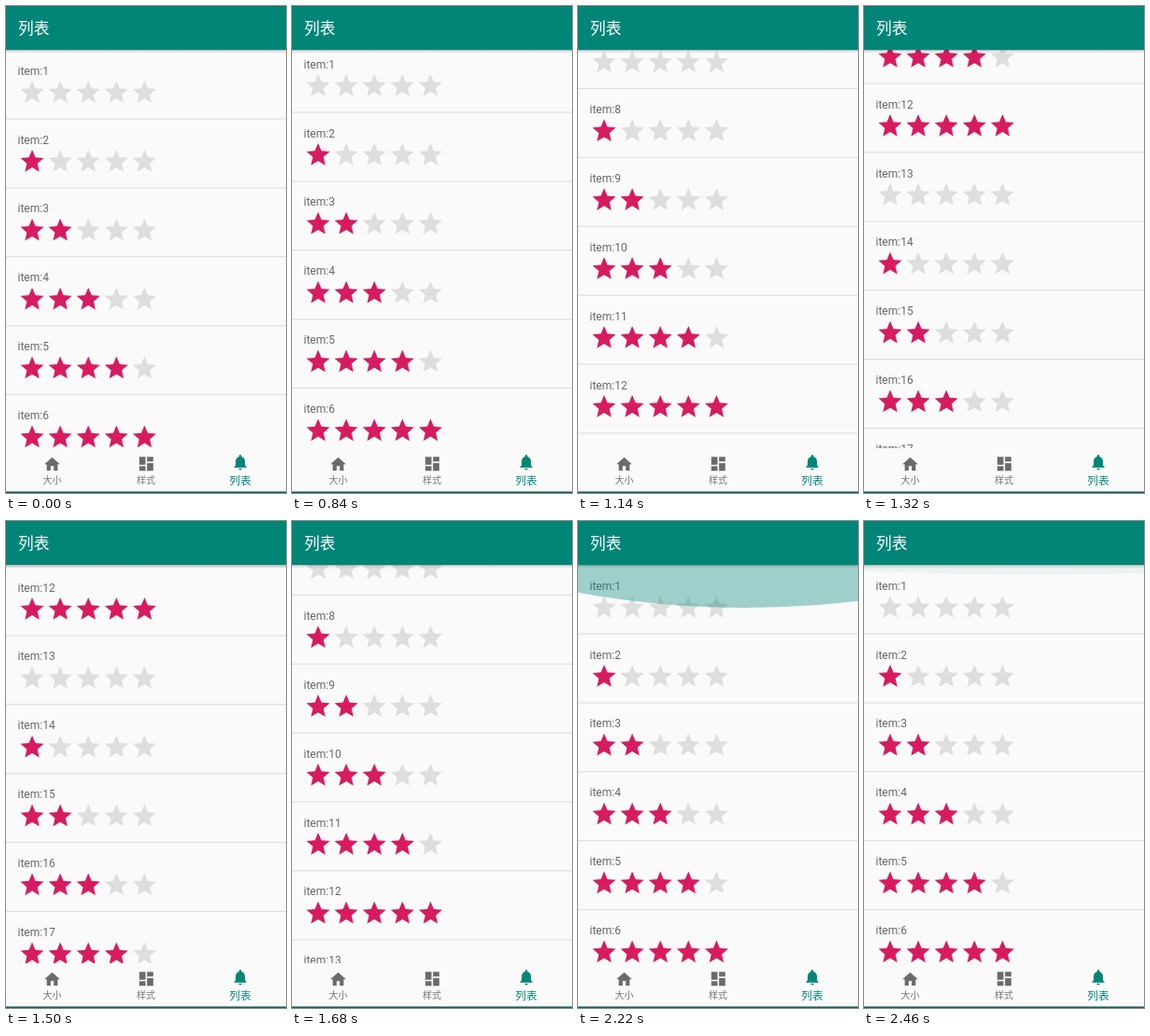
Recreate the animation shown at these times as an HTML page. Size 300 px wide and 522 px high, loop 2520 ms.

```html
<!DOCTYPE html>
<html lang="zh-CN">
<head>
<meta charset="utf-8">
<title>列表</title>
<style>
  html, body { margin: 0; width: 100%; height: 100%; overflow: hidden; background: #fafafa; }
  svg { display: block; width: 300px; height: 522px; }
  text { font-family: Roboto, "Noto Sans CJK SC", "Noto Sans CJK", sans-serif; }
  .item { font-size: 12px; fill: #686868; }
  .title { font-size: 16.7px; fill: #fff; }
  .tab { font-size: 10px; fill: #757575; text-anchor: middle; }
  .tab.on { font-size: 11.7px; fill: #008577; }
  .icon { fill: #6b6b6b; }
  .icon.on { fill: #008577; }
</style>
</head>
<body>
<svg viewBox="0 0 300 522">
  <defs>
    <path id="star" d="M12 17.27L18.18 21l-1.64-7.03L22 9.24l-7.19-.61L12 2 9.19 8.63 2 9.24l5.46 4.73L5.82 21z"/>
    <linearGradient id="shade" x2="0" y2="1">
      <stop offset="0" stop-color="#000" stop-opacity=".3"/>
      <stop offset=".4" stop-color="#000" stop-opacity=".09"/>
      <stop offset="1" stop-color="#000" stop-opacity="0"/>
    </linearGradient>
  </defs>
  <rect width="300" height="522" fill="#fafafa"/>
  <g id="list"></g>
  <path id="glow" d="M0 0V29.8Q150 56.8 300 38.8V0z" fill="#008577" opacity="0"/>

  <rect y="47" width="300" height="4" fill="url(#shade)"/>
  <rect width="300" height="47" fill="#008577"/>
  <text class="title" x="13" y="30.2">列表</text>

  <rect y="474" width="300" height="48" fill="#fafafa"/>
  <path class="icon" transform="translate(39.5 481.3) scale(.8333)" d="M10 20v-6h4v6h5v-8h3L12 3 2 12h3v8z"/>
  <path class="icon" transform="translate(140.3 480.8) scale(.8333)" d="M3 13h8V3H3zM3 21h8v-6H3zM13 21h8V11h-8zM13 3v6h8V3z"/>
  <path class="icon on" transform="translate(241 479) scale(.8333)" d="M12 22c1.1 0 2-.9 2-2h-4c0 1.1.9 2 2 2zM18 16v-5c0-3.07-1.64-5.64-4.5-6.32V4a1.5 1.5 0 0 0-3 0v.68C7.63 5.36 6 7.92 6 11v5l-2 2v1h16v-1z"/>
  <text class="tab" x="49.5" y="512.3">大小</text>
  <text class="tab" x="150" y="512.3">样式</text>
  <text class="tab on" x="251" y="512.6">列表</text>
  <rect y="520.4" width="300" height="1.6" fill="#14615a"/>
</svg>
<script>
  const LOOP = 2520, STEP = 60, TOP = 47.5, ROW = 73.9, ROWS = 20;
  const list = document.getElementById('list');
  const glow = document.getElementById('glow');

  function rowMarkup(i) {
    let stars = '';
    for (let s = 0; s < 5; s++) {
      const color = s < i % 6 ? '#d81b60' : '#dedede';
      stars += `<use href="#star" fill="${color}" transform="translate(${13 + s * 30.1} 30) scale(1.25)"/>`;
    }
    return `<g transform="translate(0 ${TOP + i * ROW})">
      <text class="item" x="12.5" y="26.2">item:${i + 1}</text>${stars}
      <rect y="73" width="300" height="1" fill="#dcdcdc"/></g>`;
  }
  list.innerHTML = Array.from({ length: ROWS }, (_, i) => rowMarkup(i)).join('');

  // time, scroll offset, speed in px/ms
  const path = [
    [840, 7, 0.6], [1140, 476, 1.75], [1410, 835, 0],
    [1500, 811, -0.9], [1920, 39, -0.7], [1990, 0, 0]
  ];

  function scrollAt(t) {
    if (t < path[0][0]) return 0;
    for (let i = 1; i < path.length; i++) {
      const [t0, y0, v0] = path[i - 1], [t1, y1, v1] = path[i];
      if (t > t1) continue;
      const d = t1 - t0, u = (t - t0) / d, w = 1 - u;
      return w * w * (y0 * (1 + 2 * u) + v0 * d * u) +
             u * u * (y1 * (1 + 2 * w) - v1 * d * w);
    }
    return 0;
  }

  // overscroll glow: pulled out, then receding
  function glowAt(t) {
    if (t < 1980) return 0;
    if (t < 2200) return 1 - ((2200 - t) / 220) ** 2;
    return Math.min(1, ((2680 - t) / 460) ** 2);
  }

  const start = performance.now();
  function draw() {
    const elapsed = (performance.now() - start) % LOOP;
    const t = Math.floor(elapsed / STEP) * STEP;
    const g = glowAt(t);
    list.setAttribute('transform', `translate(0 ${-scrollAt(t).toFixed(2)})`);
    glow.setAttribute('transform', `translate(0 47) scale(1 ${g})`);
    glow.setAttribute('opacity', 0.37 * g ** 1.3);
    requestAnimationFrame(draw);
  }
  draw();
</script>
</body>
</html>
```
